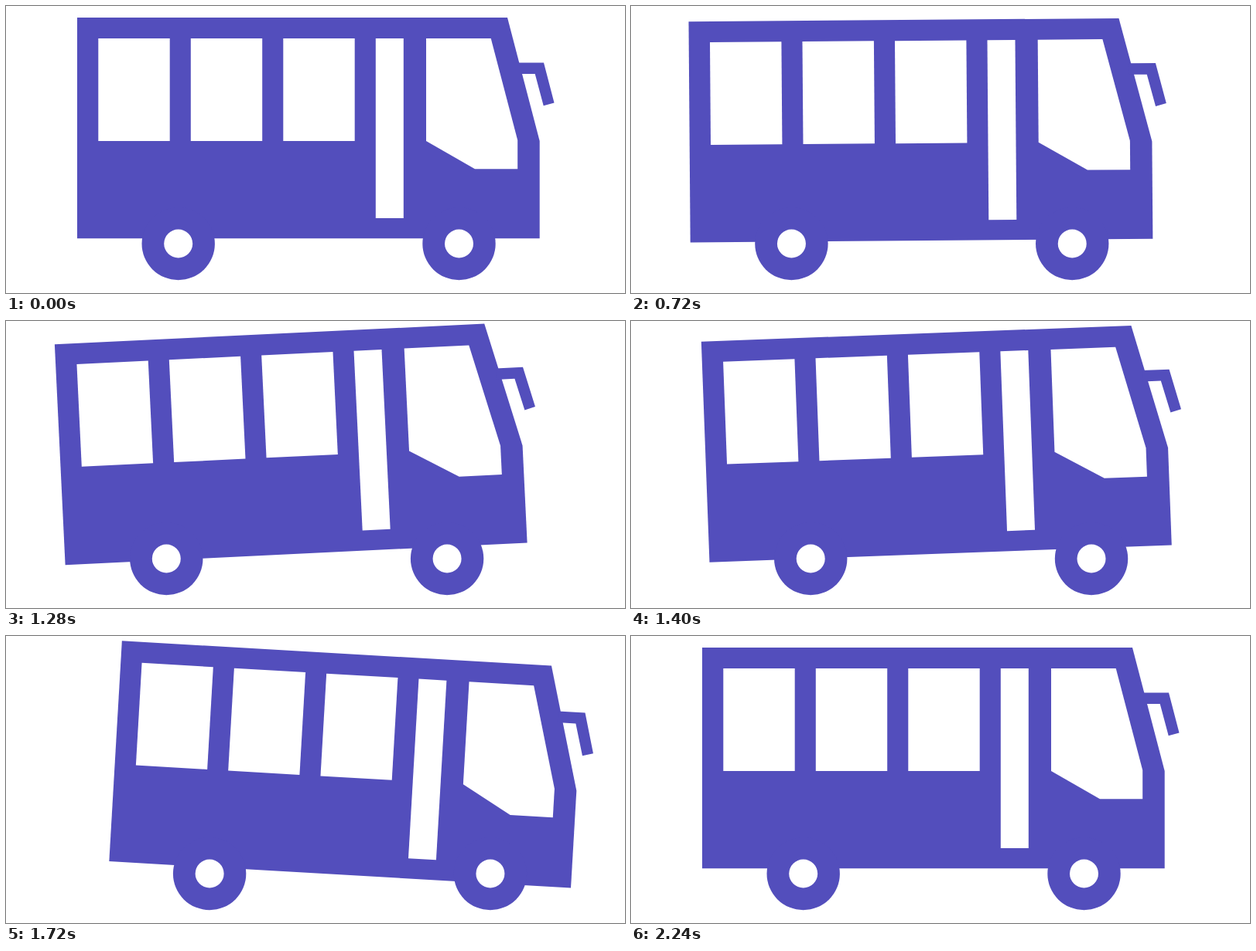
These frames come from a looping animation (800x372 px, 3.04 s). An HTML page:

```html
<!DOCTYPE html>
<html lang="en">
<head>
<meta charset="utf-8">
<title>Bus</title>
<style>
html, body { margin: 0; width: 100%; height: 100%; overflow: hidden; background: #fff; }
svg { display: block; width: 800px; height: 372px; fill: #534ebc; }
.hole { fill: #fff; }
</style>
</head>
<body>
<svg viewBox="0 0 800 372">
  <g id="bus">
    <g id="shell">
      <path d="M92 15H648L689.7 175V301.2H92Z"/>
      <path d="M660 73.5H695L708.5 125.5L694.7 129.3L683.7 88H660Z"/>
      <path class="hole" d="M667 88H683.7L690 112V175Z" visibility="hidden"/>
      <g class="hole">
        <rect id="pane" x="119.3" y="42" width="92.4" height="133"/>
        <use href="#pane" x="119.5"/>
        <use href="#pane" x="239"/>
        <rect x="477.8" y="42" width="36" height="233"/>
        <path d="M543 42H626.7L661.2 174V211.3H606L543 175Z"/>
      </g>
    </g>
    <g id="wheel">
      <circle cx="222.7" cy="308" r="47.2"/>
      <circle class="hole" cx="222.7" cy="308" r="18.5"/>
    </g>
    <use href="#wheel" x="362.8"/>
  </g>
</svg>
<script>
const LOOP = 3040, STEP = 40;
const bus = document.getElementById('bus');
const shell = document.getElementById('shell');

// Eased progress from 0 to 1 between two times; a higher power delays the start.
function glide(t, from, to, power = 1) {
  const p = Math.min(1, Math.max(0, (t - from) / (to - from)));
  return (1 - Math.cos(Math.PI * p ** power)) / 2;
}

// Roll back, dash forward, return to rest.
const drive = t =>
  -34.3 * glide(t, 520, 950) + 77.3 * glide(t, 1095, 1657) - 43 * glide(t, 1650, 2094);

// The shell sinks on its springs at both turning points.
const sink = t =>
  7.5 * glide(t, 40, 1080, 2) - 7.2 * glide(t, 1080, 1310)
  + 8 * glide(t, 1380, 1700) - 8.3 * glide(t, 1665, 2240);

// It leans back when pulling away and forward when braking.
const tilt = t =>
  -2.75 * glide(t, 560, 1172) + 6.1 * glide(t, 1325, 1690) - 3.35 * glide(t, 1685, 2240);

function draw() {
  const t = Math.floor((performance.now() - start) % LOOP / STEP) * STEP;
  bus.setAttribute('transform', `translate(${drive(t)} 0)`);
  shell.setAttribute('transform', `translate(0 ${sink(t)}) rotate(${tilt(t)} 391 308)`);
  requestAnimationFrame(draw);
}

const start = performance.now();
draw();
</script>
</body>
</html>
```
